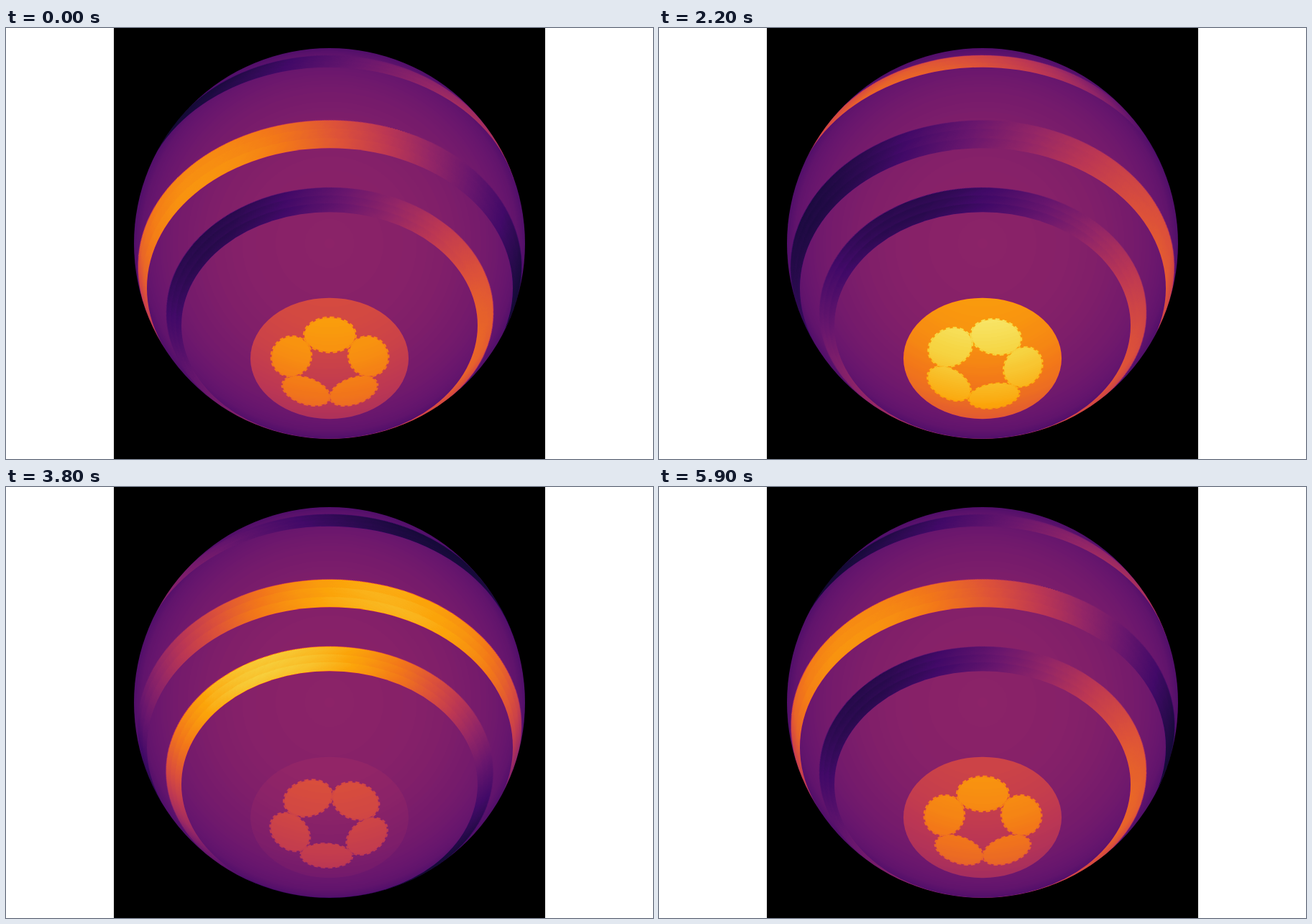
An HTML page without scripts that plays this animation: 900 by 600 pixels, repeating every 6 s.

```html
<!DOCTYPE html>
<html lang="en">
<head>
<meta charset="utf-8">
<title>Banded globe</title>
<style>
html, body { margin: 0; width: 100%; height: 100%; overflow: hidden; background: #fff; }
.sky { position: absolute; left: 150px; top: 0; width: 600px; height: 600px; background: #000; }

/* Painted in grey brightness, then mapped to colour by the filter */
.globe {
  position: absolute; left: 28px; top: 28px; width: 544px; height: 544px;
  background: hsl(0 0% 38.5%);
  clip-path: circle(272px);
  filter: url(#heat);
}
.limb {
  position: absolute; inset: 0;
  background: radial-gradient(closest-side,
    rgb(0 0 0 / 0), rgb(0 0 0 / .032) 40%, rgb(0 0 0 / .076) 60%, rgb(0 0 0 / .152) 80%,
    rgb(0 0 0 / .214) 90%, rgb(0 0 0 / .274) 96%, rgb(0 0 0 / .38));
}

/* Disc bounded by the circle at polar angle --t, pole tilted 40deg to the viewer */
.lat {
  --r: calc(272px * sin(var(--t)));
  position: absolute; left: 50%; top: 50%;
  width: calc(2 * var(--r)); height: calc(2 * var(--r));
  margin: calc(-1 * var(--r)) 0 0 calc(-1 * var(--r));
  border-radius: 50%;
  background: hsl(0 0% 38.5%);
  transform: translateY(calc(174.84px * cos(var(--t)))) scaleY(.766);
}
.wave { background: none; }
.wave::before {
  content: ""; position: absolute; inset: 0; border-radius: 50%;
  background: linear-gradient(hsl(0 0% 14.5%), hsl(0 0% 91.5%));
}
.wave::before, .spin { animation: turn 6s steps(60, jump-none) infinite; }
@keyframes turn {
  from { rotate: var(--start); }
  to { rotate: calc(var(--start) - var(--turns) * 360deg); }
}
.south { --start: -60deg; --turns: 12; }
.equator { --start: 111deg; --turns: 12; }
.north { --start: -47deg; --turns: 24; }

.cap { animation: glow 3s cubic-bezier(.364, 0, .636, 1) -1.475s infinite alternate; }
@keyframes glow {
  from { background-color: hsl(0 0% 34%); }
  to { background-color: hsl(0 0% 86%); }
}

.pole, .spin { position: absolute; inset: 0; transform-style: preserve-3d; }
.pole { transform: rotateX(-40deg); }
.spin { --start: 0deg; --turns: 2; }
.spot {
  position: absolute; left: 50%; top: 50%; box-sizing: border-box;
  width: 75px; height: 58px; margin: -29px 0 0 -37.5px;
  border: 2.5px dashed; border-radius: 50%;
  background: currentColor padding-box;
  transform: rotateZ(calc(var(--n) * 72deg)) rotateX(12deg) translateZ(271px);
  animation: flare 3s linear -1.475s infinite alternate;
}
@keyframes flare {
  0% { color: hsl(0 0% 55%); }
  20% { color: hsl(0 0% 58%); }
  50% { color: hsl(0 0% 82%); }
  70%, 100% { color: hsl(0 0% 96.5%); }
}
</style>
</head>
<body>
<svg width="0" height="0" style="position:absolute">
  <filter id="heat" color-interpolation-filters="sRGB" x="0" y="0" width="1" height="1">
    <feComponentTransfer>
      <feFuncR type="table" tableValues="0 .086 .259 .416 .576 .737 .867 .953 .988 .965 .988"/>
      <feFuncG type="table" tableValues="0 .043 .039 .09 .149 .216 .318 .471 .647 .843 1"/>
      <feFuncB type="table" tableValues=".016 .224 .408 .431 .404 .329 .227 .098 .039 .275 .643"/>
    </feComponentTransfer>
  </filter>
</svg>
<div class="sky">
  <div class="globe">
    <div class="lat wave south" style="--t:114.4deg"></div>
    <div class="lat wave south" style="--t:111deg"></div>
    <div class="lat wave south" style="--t:107.6deg"></div>
    <div class="lat" style="--t:104.25deg"></div>

    <div class="lat wave equator" style="--t:79.2deg"></div>
    <div class="lat wave equator" style="--t:75.9deg"></div>
    <div class="lat wave equator" style="--t:72.6deg"></div>
    <div class="lat" style="--t:69.3deg"></div>

    <div class="lat wave north" style="--t:56.7deg"></div>
    <div class="lat wave north" style="--t:54.2deg"></div>
    <div class="lat wave north" style="--t:51.8deg"></div>
    <div class="lat" style="--t:49.3deg"></div>

    <div class="lat cap" style="--t:23.9deg"></div>
    <div class="pole">
      <div class="spin">
        <div class="spot" style="--n:0"></div>
        <div class="spot" style="--n:1"></div>
        <div class="spot" style="--n:2"></div>
        <div class="spot" style="--n:3"></div>
        <div class="spot" style="--n:4"></div>
      </div>
    </div>
    <div class="limb"></div>
  </div>
</div>
</body>
</html>
```
